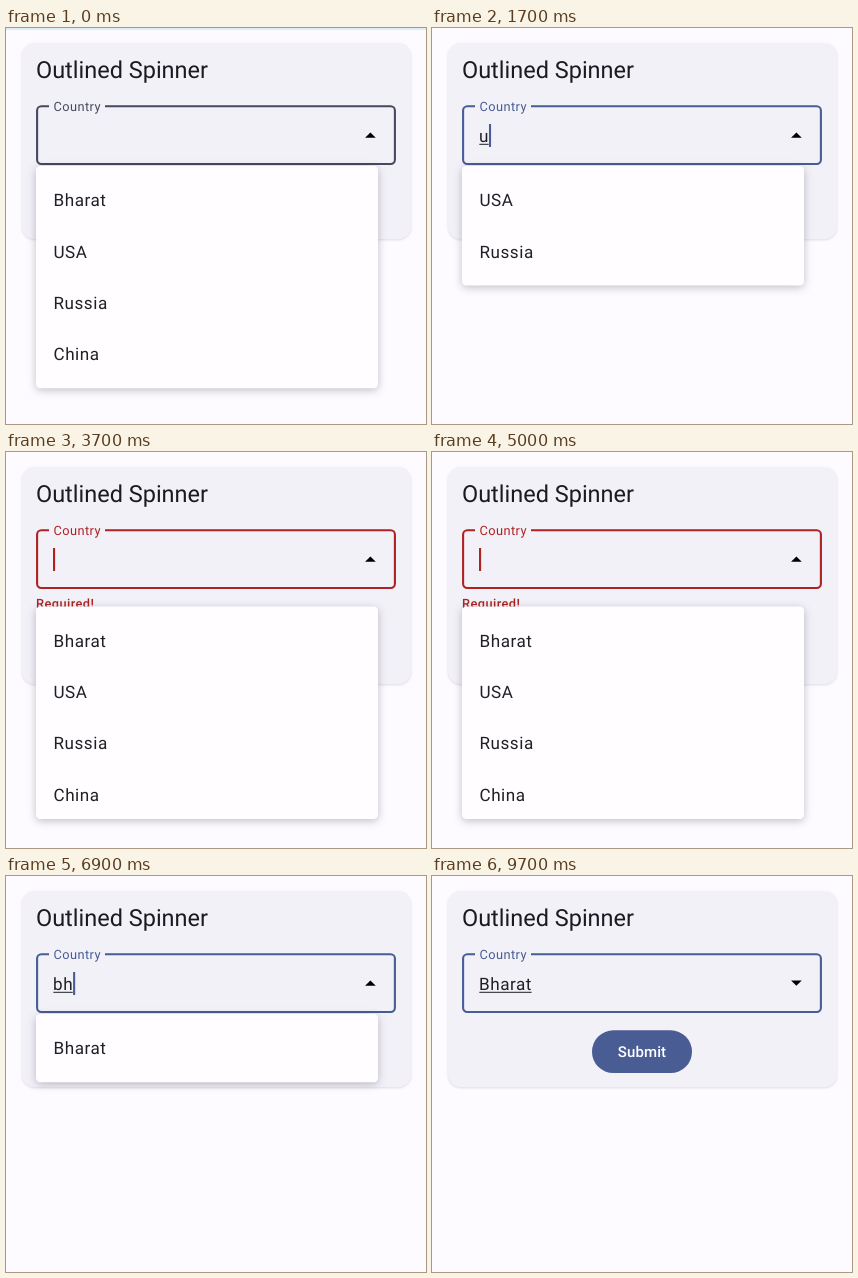
These frames come from a looping animation (420 by 396 pixels, 10000 ms). An HTML page:

```html
<!DOCTYPE html>
<html lang="en">
<head>
<meta charset="utf-8">
<title>Outlined Spinner</title>
<style>
  html, body { margin: 0; width: 100%; height: 100%; overflow: hidden; background: #fdfbff; }
  svg { display: block; font-family: Roboto, sans-serif; text-rendering: geometricPrecision; }
  .card { fill: #f3f1f8; filter: drop-shadow(0 1px 1px rgba(30, 30, 50, .14)); }
  .title { font-size: 23.5px; fill: #1a1b20; }
  .body { font-size: 17.1px; letter-spacing: .53px; fill: #1f2026; white-space: pre; }
  .small { font-size: 12.8px; letter-spacing: .43px; }
  .error { font-weight: 500; fill: #ae2222; }
  .submit { font-size: 15px; font-weight: 500; letter-spacing: .1px; fill: #fff; text-anchor: middle; }
  .menu { filter: drop-shadow(0 2px 4px rgba(20, 20, 35, .26)); }
</style>
</head>
<body>
<svg width="420" height="396" viewBox="0 0 420 396">
  <rect id="edge" width="420" height="2" fill="#dceff8"/>
  <rect id="card" class="card" x="16" y="15" width="389" height="196" rx="12.5"/>
  <text class="title" x="30" y="49.5">Outlined Spinner</text>
  <path id="outline" d="M43 78.3H35.3a4.2 4.2 0 0 0-4.2 4.2V131.8a4.2 4.2 0 0 0 4.2 4.2H384.7a4.2 4.2 0 0 0 4.2-4.2V82.5a4.2 4.2 0 0 0-4.2-4.2H99" fill="none" stroke-width="2.1"/>
  <text id="label" class="small" x="47.5" y="82.6">Country</text>
  <text id="value" class="body" x="47" y="114.4"></text>
  <rect id="underline" x="47.3" y="115.8" height="1" fill="#1f2026"/>
  <rect id="cursor" y="96" width="2.1" height="23"/>
  <path id="arrow" d="M-5.35 2.67L0-2.67L5.35 2.67Z"/>
  <text id="error" class="small error" x="30" y="155.6">Required!</text>
  <g id="submit">
    <rect x="160" y="154.3" width="100" height="42.8" rx="21.4" fill="#495d94"/>
    <text class="submit" x="210" y="181.4">Submit</text>
  </g>
  <g id="menu" class="menu">
    <rect id="sheet" x="30" width="342" rx="4.2" fill="#fffdff"/>
    <g id="rows"></g>
  </g>
</svg>
<script>
const LOOP = 10000, BLINK = 500;
const BLUE = [71, 93, 148], GREY = [70, 74, 94], RED = [174, 34, 34];
const ALL = ['Bharat', 'USA', 'Russia', 'China'];
const ITEM = 51.3, PAD = 8.5, ENTER = 120, EXIT = 75;

// time, typed text
const typing = [
  [0, ''], [1300, 'u'], [2400, 'us'], [3400, 'u'], [3520, ''],
  [5250, 'b'], [5454, 'bh'], [7050, 'Bharat']
];
const ERROR_FROM = 3520, ERROR_TO = 5250;
// open and close times of the menu
const openings = [[-ENTER, 5250], [5454, 8480]];

const $ = id => document.getElementById(id);
const set = (el, attrs) => { for (const k in attrs) el.setAttribute(k, attrs[k]); };
const show = (el, on) => el.setAttribute('visibility', on ? 'visible' : 'hidden');
const mix = (a, b, p) => `rgb(${a.map((v, i) => Math.round(v + (b[i] - v) * p))})`;
const clamp = p => Math.max(0, Math.min(1, p));

const [edge, card, outline, label, value, underline, cursor, arrow, error, submit, menu, sheet, rowBox] =
  ['edge', 'card', 'outline', 'label', 'value', 'underline', 'cursor', 'arrow', 'error', 'submit', 'menu', 'sheet', 'rows'].map($);

const rows = ALL.map((_, i) => {
  const row = document.createElementNS('http://www.w3.org/2000/svg', 'text');
  set(row, { class: 'body', x: 47.5, y: PAD + ITEM * (i + .5) + 6.2 });
  return rowBox.appendChild(row);
});

function drawMenu(t, text, failed) {
  const span = openings.filter(o => t >= o[0]).pop();
  const open = t < span[1];
  const leave = clamp((t - span[1]) / EXIT);
  const grow = 1 - (1 - clamp((t - span[0]) / ENTER)) ** 3;
  const scale = open ? .8 + .2 * grow : 1 - .2 * leave;
  const alpha = open ? clamp((t - span[0]) / 30) : 1 - leave;
  const items = ALL.filter(s => s.toLowerCase().includes(text.toLowerCase()));
  const top = failed ? 154.4 : 138;
  set(menu, {
    transform: `translate(201 ${top}) scale(${scale}) translate(-201 0)`,
    opacity: alpha
  });
  show(menu, alpha > 0);
  sheet.setAttribute('height', failed ? 212.6 : 2 * PAD + ITEM * items.length);
  rows.forEach((row, i) => { row.textContent = items[i] || ''; });
  set(arrow, { transform: `translate(364.4 107.2) scale(1 ${open ? 1 : -1})` });
}

function draw(t) {
  const [since, text] = typing.filter(s => t >= s[0]).pop();
  const failed = t >= ERROR_FROM && t < ERROR_TO;
  const color = failed ? mix(RED, RED, 0) : mix(GREY, BLUE, clamp(t / 150));

  show(edge, t < 100);
  card.setAttribute('height', failed ? 217 : 196);
  outline.setAttribute('stroke', color);
  label.setAttribute('fill', color);
  value.textContent = text;
  const width = text ? value.getComputedTextLength() : 0;
  underline.setAttribute('width', Math.max(0, width - .6));
  set(cursor, { x: 47 + width, fill: color });
  const age = t - (since || 100);
  show(cursor, age >= 0 && age % (2 * BLINK) < BLINK);
  show(error, failed);
  submit.setAttribute('transform', `translate(0 ${failed ? 21 : 0})`);
  drawMenu(t, text, failed);
}

const start = performance.now();
function tick() {
  draw((performance.now() - start) % LOOP);
  requestAnimationFrame(tick);
}
tick();
</script>
</body>
</html>
```
